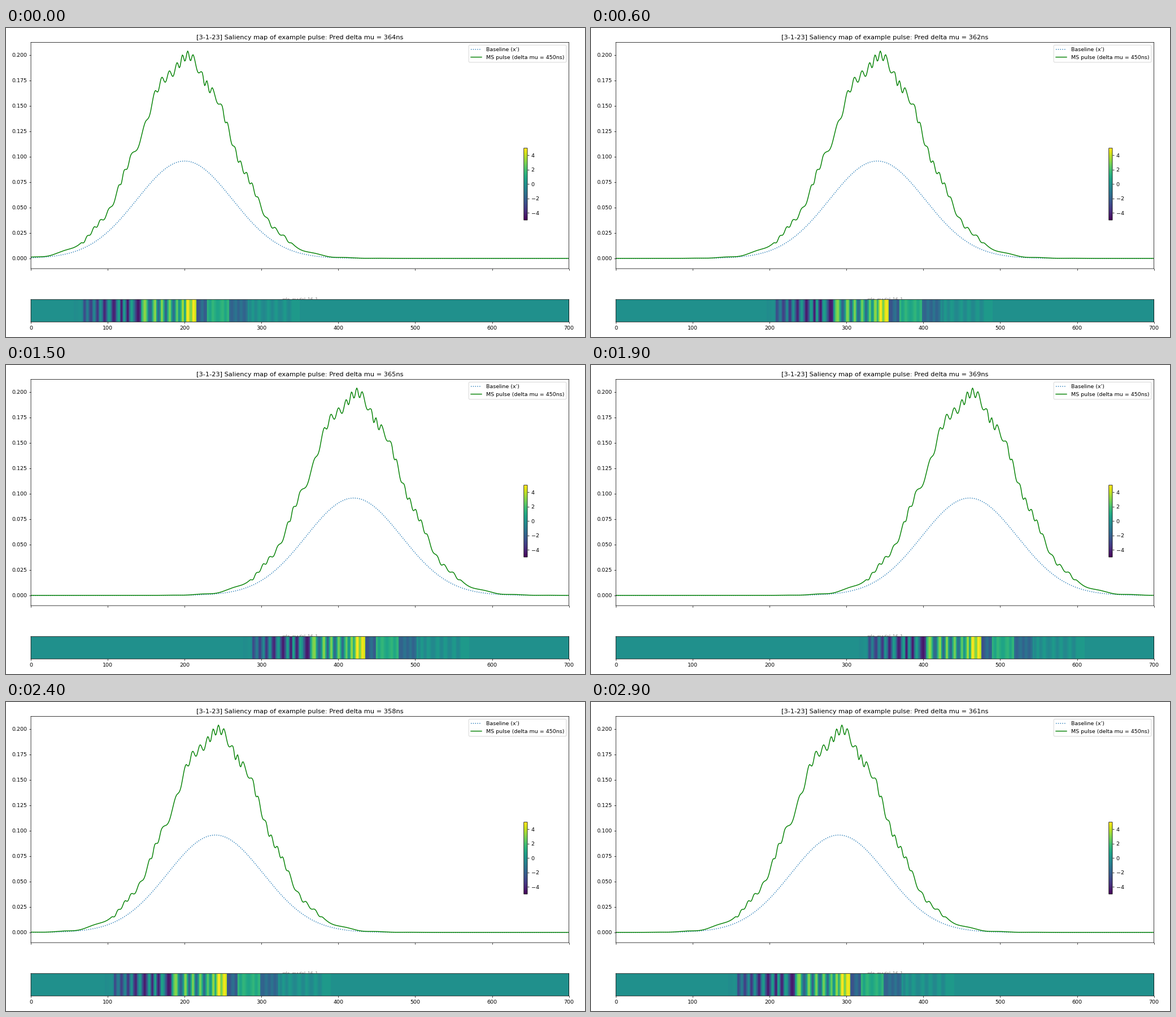
Animation of 1025 by 547 pixels, one loop 3 s. Source, as a matplotlib script:

```python
import numpy as np
import matplotlib.pyplot as plt
from matplotlib.animation import FuncAnimation

W, H = 1025, 547
DPI = W / 15       # a 15 by 8 inch figure
COUNT = 30
STEP = 10          # shift of the pulse per index, in ns

# Ripple crests at zero shift; they get irregular away from the peak
CRESTS = [65, 73, 82, 90, 101, 114, 121, 130, 148, 161, 170, 180, 190, 197, 204,
          211, 223, 229, 236, 249, 256, 266, 273, 281, 288, 296, 309, 318, 330,
          340]

# Saliency plateaus at zero shift: start time -> level
PLATEAUS = {0: 0, 56: -0.7, 68: -1.8, 143: 0.7, 193: 2, 201: 4, 215: -1.8,
            229: 1.2, 258: -1.5, 282: 0}

# Predicted delta mu at a few indices, interpolated between them
PREDICTED = {0: 364, 4: 358, 9: 361, 14: 362, 19: 353, 22: 365, 26: 369}


def bell(t, center, sigma, peak):
    return peak * np.exp(-((t - center) / sigma) ** 2 / 2)


def ripple(t):
    return np.cos(2 * np.pi * np.interp(t, CRESTS, range(len(CRESTS))))


def baseline(t):
    return bell(t, 200, 62, 0.0957)


def pulse(t):
    """Bell with slow and fast ripples that grow like counting noise."""
    envelope = bell(t, 201, 60, 0.195)
    slow = np.cos(2 * np.pi * (t - 206) / 41.5)
    return envelope + np.sqrt(envelope / 0.2) * (0.005 * slow + 0.0045 * ripple(t))


def saliency(t):
    """Plateaus carrying the pulse's ripple, strongest on the rising side."""
    starts, levels = np.array(list(PLATEAUS.items())).T
    level = levels[np.clip(np.searchsorted(starts, t, side="right") - 1, 0, None)]
    swing = 0.4 + 2.2 * np.exp(-((t - 140) / 65) ** 4)
    active = (t >= 56) & (t < 350)
    return (level + active * swing * ripple(t))[None, :]


def add_axes(left, top, right, bottom):
    return fig.add_axes([left / W, 1 - bottom / H,
                         (right - left) / W, (bottom - top) / H])


plt.rcParams["path.snap"] = False
time = np.arange(700)
order = sorted(range(COUNT), key=str)   # 0, 1, 10, 11, ... 19, 2, 20, ...

fig = plt.figure(figsize=(W / DPI, H / DPI), dpi=DPI, facecolor="white")
plot = add_axes(44.1, 25.6, 996.6, 426)
strip = add_axes(44.1, 480.7, 996.6, 520.3)
bar = add_axes(916.7, 212.7, 923, 340)

base_line, = plot.plot(time, baseline(time), ":", label="Baseline (x')")
pulse_line, = plot.plot(time, pulse(time), color="green",
                        label="MS pulse (delta mu = 450ns)")
plot.set(xlim=(0, 700), ylim=(-0.0101, 0.2123),
         yticks=np.arange(0, 0.201, 0.025))
plot.yaxis.set_major_formatter("{x:.3f}")
plot.tick_params(labelbottom=False)
plot.legend(loc="upper right")
title = plot.set_title("")

image = strip.imshow(saliency(time), vmin=-5, vmax=5, aspect="auto",
                     interpolation="nearest", extent=(0, 700, 0, 1))
strip.set_yticks([])
fig.colorbar(image, cax=bar, ticks=[-4, -2, 0, 2, 4])

# Caption mostly hidden behind the strip
fig.text(520.5 / W, 1 - 484 / H, "mlp_model_16_1", size=8, color="gray",
         ha="center", va="baseline", zorder=-1)


def update(frame):
    index = order[frame]
    t = time - index * STEP
    base_line.set_ydata(baseline(t))
    pulse_line.set_ydata(pulse(t))
    image.set_data(saliency(t))
    predicted = np.interp(index, list(PREDICTED), list(PREDICTED.values()))
    title.set_text("[3-1-23] Saliency map of example pulse: "
                   f"Pred delta mu = {predicted:.0f}ns")
    return base_line, pulse_line, image, title


anim = FuncAnimation(fig, update, frames=COUNT, interval=100,
                     init_func=lambda: update(0), repeat=True, repeat_delay=0)
plt.show()
```
